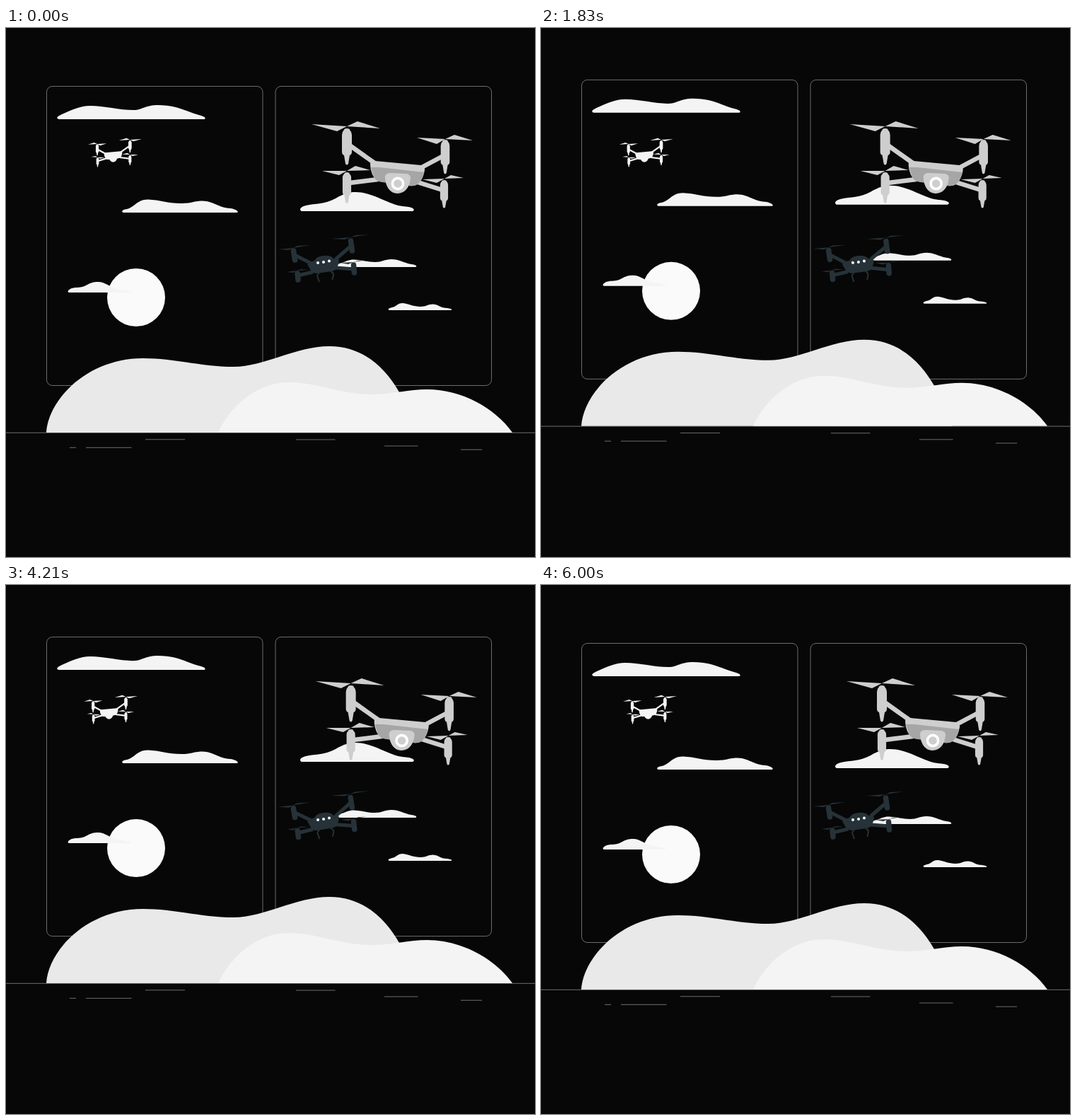
Write an HTML page that moves like this. It is 748x748 px and loops after 6.04 s.

```html
<!DOCTYPE html>
<html lang="en">
<head>
<meta charset="utf-8">
<title>Drones</title>
<style>
  html, body { margin: 0; height: 100%; overflow: hidden; background: #070707; }
  svg { display: block; width: 100%; height: 100%; }
  .line { fill: none; stroke: #ebebeb; stroke-width: .45; }
  .cloud { fill: #f4f4f4; }
  #grey { --light: #cecece; --shade: #a6a6a6; --lens: #fff; }
  #white { --light: #f4f4f4; --shade: #f4f4f4; --lens: #f4f4f4; }
  #quad { fill: var(--light); }
  .arms { fill: none; stroke: var(--light); stroke-width: 6.5; }
  #dark { fill: #263238; stroke: #263238; stroke-width: 0; }
  #dark .arms { stroke: #263238; stroke-width: 5; }
</style>
</head>
<body>
<svg viewBox="0 0 748 748">
  <defs>
    <path id="motor" d="M-4 2Q-4 0 0 0T4 2Q7 5 7 9V33Q7 37 4 38L2 50Q0 53 -2 50L-4 38Q-7 37 -7 33V9Q-7 5 -4 2Z"/>
    <g id="quad">
      <path class="arms" d="M486 166L524 193M618 181L586 198M486 219L526 214M582 218L617 229"/>
      <use href="#motor" transform="translate(482 142)"/>
      <use href="#motor" transform="translate(621 158) scale(.9 .94)"/>
      <use href="#motor" transform="translate(482 204) scale(.87 .85)"/>
      <use href="#motor" transform="translate(619.5 215) scale(.8 .77)"/>
      <path d="M432 136L482 139 468 146ZM482 139L497 132 529 142Z
               M581 155L621 157 609 164ZM621 157L634 151 660 159Z
               M447 202L482 202 471 208ZM482 202L494 195 515 201Z
               M589 214L620 213 609 219ZM620 213L629 208 647 212Z"/>
      <path d="M515 193Q515 187 522 188L587 194Q593 195 592 201Q590 213 584 219Q580 224 570 223L530 217Q522 216 518 207Q515 200 515 193Z"/>
      <path fill="var(--shade)" d="M516 197L528 197 591 204Q588 216 582 221Q578 224 570 223L532 218Q523 217 520 210Z"/>
      <path d="M536 210Q537 205 544 205L566 206Q572 207 572 212Q571 222 567 227Q562 234 553 234Q544 233 540 226Q536 219 536 210Z"/>
      <circle cx="554" cy="220" r="7.6" fill="none" stroke="var(--lens)" stroke-width="3.6"/>
    </g>
  </defs>

  <g id="scene">
    <rect class="line" x="57.5" y="82.5" width="305.5" height="423" rx="8"/>
    <rect class="line" x="381" y="82.5" width="305.5" height="423" rx="8"/>
    <circle cx="184" cy="381" r="41" fill="#fafafa"/>
    <g class="cloud">
      <path d="M75 129C70 128 72 125 79 122C93 116 105 110 119 110C140 110 165 117 183 116C193 115 198 109 215 109C243 109 256 119 276 124C283 126 283 129 279 129Z"/>
      <path d="M166 261C162 259 165 257 171 256C181 254 186 242 201 242.5C218 243 228 248 248 248C262 248 266 244.5 278 244.5C294 245 300 254 317 255C324 256 330 259 327 261Z"/>
      <path d="M418 259C414 257 416 253 424 251C437 248 452 249 466 241C478 234 485 232 494 232C512 232 528 241 543 247C552 251 560 252 569 253C576 254 579 257 575 259Z"/>
      <path d="M469 338C467 336 469 333 475 332C481 330 484 327.5 492 327.5C504 328 510 331 522 331C532 331 535 327 545 327C556 327 562 332 573 334C580 335 582 337 579 338Z"/>
      <path d="M542 399C539 398 541 396 546 395C552 394 553 389 561 389C570 390 576 394 586 394C594 394 597 390.5 604 390.5C612 391 614 396 624 396C630 397 632 398 629 399Z"/>
      <path d="M89 374C86 373 88 370 93 368C100 366 106 368 113 364C120 360 124 359 130 359C141 359 147 367 158 369C165 370 172 371 175 372C177 373 176 374 174 374Z"/>
    </g>
    <path fill="#e9e9e9" d="M57 572C60 525 115 467 194 467C240 467 275 479 322 479C365 479 410 450 457 450C510 450 540 487 556 515Q573 543 582 572Z"/>
    <path class="cloud" d="M300 572C318 533 356 501 400 501C440 501 470 518 520 518C550 517 570 511 595 511C645 511 692 538 716 572Z"/>
    <path class="line" d="M0 572.3H748M90 593.3H99M113 593.3H177.500M197 581.800H253M410 582H465.500M535 591H582.500M643 596.200H673"/>
  </g>

  <g id="white"><use href="#quad" transform="translate(336 111.700) scale(-.3333 .3333)"/></g>
  <g id="grey"><use href="#quad"/></g>

  <g id="dark">
    <path class="arms" d="M408 321L432 333M488 308L466 327M413 350L434 345M466 339L492 341"/>
    <path stroke-width="7.500" stroke-linecap="round" d="M406.500 315L408.500 328M487.500 301L489.500 315M412 347L413 356M491.500 335L492.500 346"/>
    <path d="M385 313L406 311 400 314ZM406 311L412 308 431 307Z
             M460 298L487 296 479 299ZM487 296L494 293 513 292Z
             M397 345L411 343 406 346ZM411 343L417 341 428 342Z
             M473 332L491 331 484 334ZM491 331L498 329 510 328Z"/>
    <path d="M426 334Q431 330 436 329Q439 323 449 322Q459 321 463 326Q468 326 471 328Q470 336 467 341Q465 343 460 344L440 347Q434 347 431 343Z"/>
    <path fill="none" stroke-width="2" d="M443 346Q439 350 440.500 352L443 359M459 344Q463 346 463 349L461.500 356"/>
    <g fill="#fff"><circle cx="441" cy="332" r="2"/><circle cx="449" cy="331" r="2"/><circle cx="457" cy="329.500" r="2"/></g>
  </g>
</svg>
<script>
  const FPS = 24, FRAMES = 145, UNIT = 748 / 500;
  const SHAKE = [0, -1, 2, -4, 4, -4, 4, -4, 2, -1, 0];
  const SWAY = [0, 1, 0, -1, 0];

  // Linear interpolation through evenly spaced keys, repeating every `period` seconds
  const cycle = (keys, t, period) => {
    const p = (t / period % 1) * (keys.length - 1), i = Math.floor(p);
    return keys[i] + (keys[i + 1] - keys[i]) * (p - i);
  };
  const place = (id, value) => document.getElementById(id).setAttribute('transform', value);

  function draw(ms) {
    const t = Math.floor(ms % 6040 / 1000 * FPS + .2) % FRAMES / FPS;
    place('scene', `translate(0 ${cycle([0, -10, 0], t, 6) * UNIT})`);
    place('white', `translate(${cycle(SHAKE, t, 6) * UNIT} 0)`);
    place('grey', `translate(${cycle(SHAKE, t, 3) * UNIT} 0)`);
    place('dark', `rotate(${cycle(SWAY, t, 1.5)} 449 326)`);
  }

  const start = performance.now();
  function tick() {
    draw(performance.now() - start);
    requestAnimationFrame(tick);
  }
  tick();
</script>
</body>
</html>
```
